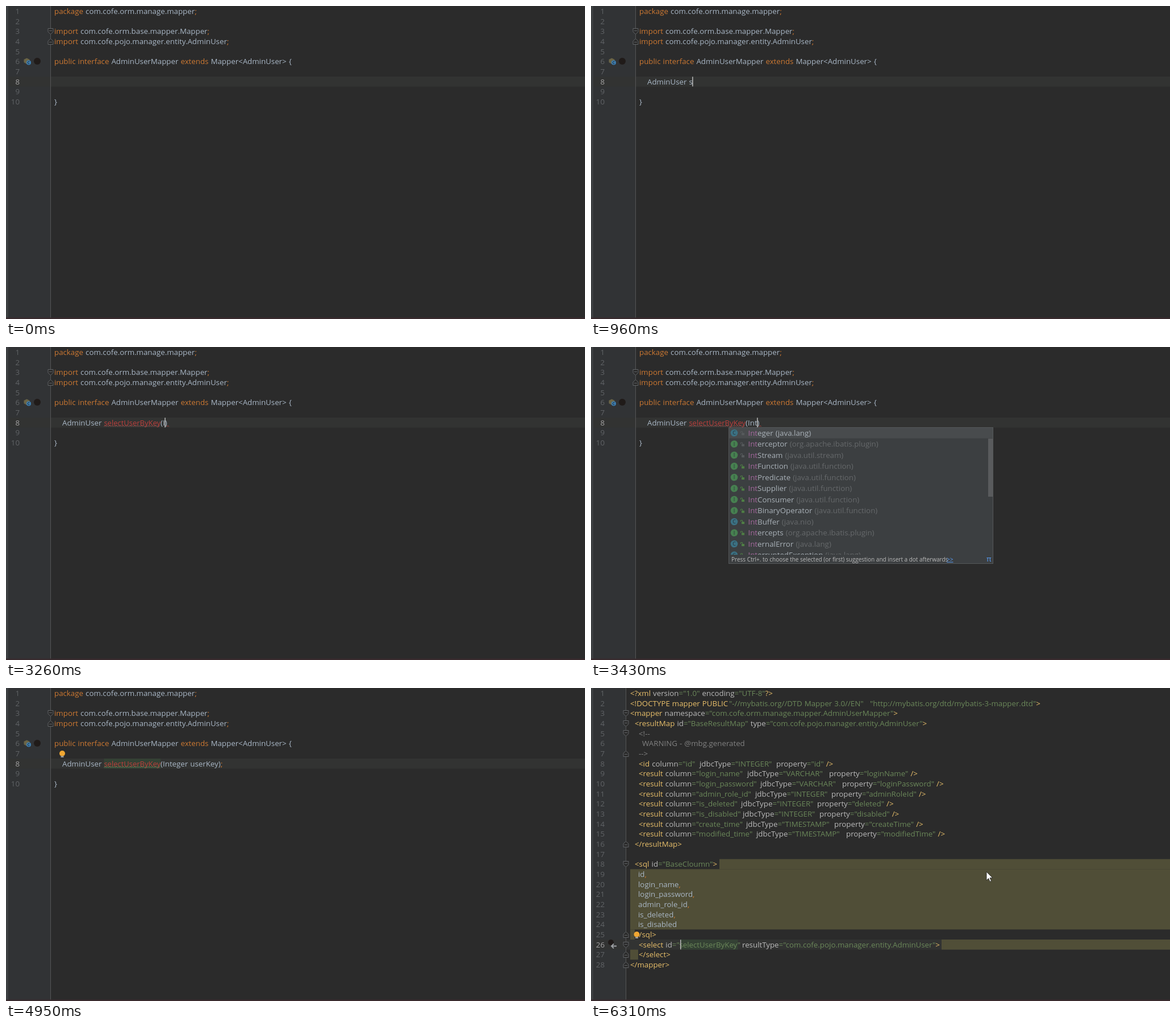
Write an HTML page that moves like this. It is 1019 px wide and 550 px high and loops after 6500 ms.

```html
<!DOCTYPE html>
<html lang="en">
<head>
<meta charset="utf-8">
<title>Mapper editor</title>
<style>
html, body { margin: 0; width: 100%; height: 100%; overflow: hidden; background: #2b2b2b; }
svg { display: block; width: 1019px; height: 550px; }
text { font: 13.3px "Open Sans", "Noto Sans", sans-serif; word-spacing: .6px; white-space: pre; fill: #a9b7c6; }
.kw { fill: #cc7832; }
.tag { fill: #e8bf6a; }
.attr { fill: #bababa; }
.str { fill: #6a8759; }
.com { fill: #808080; }
.num { fill: #606366; text-anchor: end; }
.now { fill: #a4a3a3; }
.id { font-size: 13px; }
.dim { fill: #7b837b; }
.bad { fill: #bc3f3c; }
.item { fill: #a9b1b8; }
.hit { fill: #a4689d; }
.pkg { fill: #66696b; }
.tip { font-size: 10px; word-spacing: 0; fill: #bbbbbb; }
.link { fill: #589df6; }
.mini { font-size: 9px; text-anchor: middle; fill: #263238; }
</style>
</head>
<body>
<svg viewBox="0 0 1019 550" id="stage"></svg>
<script>
const LOOP = 6500, ROW = 17.667, GREEN = '#344134', OLIVE = '#504e37';
const stage = document.getElementById('stage');
const pen = document.createElement('canvas').getContext('2d');

const esc = s => s.replace(/&/g, '&amp;').replace(/</g, '&lt;').replace(/>/g, '&gt;');
const rowTop = n => .33 + ROW * (n - 1);
const base = n => rowTop(n) + 13.6;
const rect = (x, y, w, h, fill, extra = '') =>
  `<rect x="${x}" y="${y}" width="${w}" height="${h}" fill="${fill}" ${extra}/>`;
const disc = (x, y, r, fill) => `<circle cx="${x}" cy="${y}" r="${r}" fill="${fill}"/>`;
const path = (d, stroke, fill = 'none', w = 1) =>
  `<path d="${d}" stroke="${stroke}" fill="${fill}" stroke-width="${w}"/>`;
const span = (s, cls) => `<tspan class="${cls}">${esc(s)}</tspan>`;
const text = (x, y, body, cls = '') => `<text x="${x}" y="${y}" class="${cls}">${body}</text>`;
const at = (list, t) => list.reduce((v, [start, value]) => t >= start ? value : v, list[0][1]);
const during = (t, a, b) => t >= a && t < b;

function width(s, size = 13.3) {
  pen.font = `${size}px "Open Sans", "Noto Sans", sans-serif`;
  return pen.measureText(s).width + .6 * (s.split(' ').length - 1);
}

function wave(x1, x2, y, color) {
  let d = `M${x1} ${y}`;
  for (let x = x1 + 2, up = true; x <= x2; x += 2, up = !up) d += `L${x} ${up ? y - 2 : y}`;
  return path(d, color, 'none', .9);
}

function fold(x, n, down) {
  const y = Math.round(rowTop(n) + 8.5) + .5, s = down ? 1 : -1;
  return path(`M${x - 4.5} ${y - 5 * s}h9v${6 * s}l-4.5 ${4 * s}l-4.5 ${-4 * s}z`, '#606366', '#2b2b2b') +
    path(`M${x - 2.5} ${y - s}h5`, '#606366');
}

function frame(lines, current, edge) {
  let out = rect(0, 0, 1019, 550, '#2b2b2b') + rect(4, 0, edge - 4, 550, '#313335') +
    rect(0, 0, 4, 550, '#3c3f41') + rect(4, rowTop(current), 1015, ROW, '#323332') +
    rect(edge, 0, 1, 550, '#555555');
  for (let n = 1; n <= lines; n++) out += text(24, base(n), n, 'num' + (n === current ? ' now' : ''));
  return out + rect(0, 547.5, 1019, 2.5, '#392b2e');
}

const caret = (x, n) => rect(x, rowTop(n) + .3, 1.5, ROW - .6, '#bbbbbb');
const bulb = (x, y) => disc(x, y, 5, '#f0a732') + rect(x - 2.5, y + 4.5, 5, 2.5, '#9a9da0');

// Java page
const code = (n, ...parts) =>
  text(85, base(n), parts.map(([s, cls]) => span(s, cls || '')).join(''));
const javaPage = frame(10, 8, 78) +
  code(1, ['package ', 'kw'], ['com.cofe.orm.manage.mapper'], [';', 'kw']) +
  code(3, ['import ', 'kw'], ['com.cofe.orm.base.mapper.Mapper'], [';', 'kw']) +
  code(4, ['import ', 'kw'], ['com.cofe.pojo.manager.entity.AdminUser'], [';', 'kw']) +
  code(6, ['public interface ', 'kw'], ['AdminUserMapper '], ['extends ', 'kw'], ['Mapper<AdminUser> {']) +
  code(10, ['}']) + fold(78.5, 3, true) + fold(78.5, 4, false) +
  path('M31.5 94l5-2.5 5 2.5v5l-5 3-5-3z', 'none', '#6b6547') + disc(40, 99.5, 4, '#3d7fb3') +
  path('M41.5 98a2 2 0 1 0 0 3', '#222b31') + disc(55, 97, 6, '#201b19');

const keys = [[0, '']];
const press = (t, s) => keys.push([t, s]);
function type(t, step, s) {
  for (const c of s) {
    press(t, keys[keys.length - 1][1] + c);
    t += step;
  }
}
type(170, 80, 'Admin');
press(830, 'AdminUser');
type(890, 60, ' ');
type(950, 70, 'select');
type(1670, 92, 'UserBy');
type(2250, 185, 'Key');
type(3080, 0, '(');
type(3230, 95, 'Int');
press(3560, 'AdminUser selectUserByKey(Integer');
type(3620, 55, ' user');
type(3930, 60, 'Key');
press(4350, 'AdminUser selectUserByKey(Integer userKey);');

// Identifier letters covered by the green mark
const marked = [[0, 0], [1490, 6], [1940, 10], [2440, 14], [2810, 15], [3040, 0], [4720, 15]];

function statement(t) {
  const typed = at(keys, t), y = base(8);
  const head = typed.slice(0, 10), id = typed.slice(10).split('(')[0], tail = typed.slice(10 + id.length);
  const open = tail && !tail.includes(')');
  const idX = 99 + width(head), tailX = idX + width(id, 13), endX = tailX + width(tail);
  const count = at(marked, t), markX = idX + width(id.slice(0, count), 13);
  let out = '';
  if (count) out += rect(idX, rowTop(8), markX - idX, ROW, GREEN);
  if (during(t, 3785, 3990)) out += rect(324, rowTop(8), 9, ROW, GREEN);
  out += text(99, y, esc(head)) + text(idX, y, esc(id), 'id ' + (tail ? 'bad' : count ? 'dim' : ''));
  out += text(tailX, y, esc(tail.replace(';', '') + (open ? ')' : '')));
  if (tail.endsWith(';')) out += text(endX - width(';'), y, ';', 'kw');
  if (tail) out += wave(idX, tailX, 140, t >= 4720 ? '#65875f' : '#8f5452');
  else if (count) out += wave(idX, markX, 140, '#6a7f68');
  if (open) out += wave(endX + 3, endX + 8, 140, '#bc3f3c');
  if (during(t, 4350, 4540)) out += wave(endX, endX + 3, 140, '#bc3f3c');
  if (during(t, 170, 4720)) out += caret(endX - .5, 8);
  return out;
}

// Completion lists: name, package, kind
const entity = 'com.cofe.pojo.manager.entity', mapper = 'com.cofe.orm.manage.mapper', view = 'com.cofe.pojo.manager.view';
const admins = [
  ['Admin', 'org.springframework.boot.autoconfigure.kafka.KafkaPro...', 'C'],
  ['AdminUser', entity, 'C'], ['AdminUserMapper', mapper, 'D'],
  ['AdminMenu', entity, 'C'], ['AdminMenuMapper', mapper, 'I'],
  ['AdminRole', entity, 'C'], ['AdminRoleMapper', mapper, 'I'],
  ['AdminMenuParam', view, 'C'], ['AdminRoleParam', view, 'C'], ['AdminUserParam', view, 'C'],
  ['AdminPermission', 'org.osgi.framework', 'C'],
  ['AbstractDataFieldMaxValueIncrementer', 'org.springframework.jd...', 'C']
];
const selects = [
  ['Select', 'org.apache.ibatis.annotations', 'I'], ['SelectKey', 'org.apache.ibatis.annotations', 'I'],
  ['SelectProvider', 'org.apache.ibatis.annotations', 'I'], ['Selector', 'java.nio.channels', 'C'],
  ['SelectorProvider', 'java.nio.channels.spi', 'C'], ['SelectionKey', 'java.nio.channels', 'C'],
  ['SelectableChannel', 'java.nio.channels', 'C'], ['SelectKeyGenerator', 'org.apache.ibatis.executor', 'C'],
  ['SelectionEvent', 'org.w3c.dom.events', 'C'], ['SelectItem', 'net.sf.jsqlparser.statement', 'I'],
  ['SelectBody', 'net.sf.jsqlparser.statement', 'I'], ['SelectVisitor', 'net.sf.jsqlparser', 'I']
];
const integers = [
  ['Integer', 'java.lang', 'C'], ['Interceptor', 'org.apache.ibatis.plugin', 'I'],
  ['IntStream', 'java.util.stream', 'I'], ['IntFunction', 'java.util.function', 'I'],
  ['IntPredicate', 'java.util.function', 'I'], ['IntSupplier', 'java.util.function', 'I'],
  ['IntConsumer', 'java.util.function', 'I'], ['IntBinaryOperator', 'java.util.function', 'I'],
  ['IntBuffer', 'java.nio', 'C'], ['Intercepts', 'org.apache.ibatis.plugin', 'I'],
  ['InternalError', 'java.lang', 'C'], ['InterruptedException', 'java.lang', 'C']
];
const kinds = { C: '#3b7183', I: '#478050', D: '#35463a' };

function popup(x, w, items, hits) {
  let rows = rect(x + 1, 142, w - 2, 18.5, '#484b4d');
  items.forEach(([name, pkg, kind], i) => {
    const y = 151 + 19.5 * i, n = /^Abstract/.test(name) ? 0 : hits;
    const label = n ? span(name.slice(0, n), 'hit') + span(name.slice(n), 'item')
      : name.split(/(A|D|M|In)/).map(s => span(s, /^(A|D|M|In)$/.test(s) ? 'hit' : 'item')).join('');
    const lock = i < 3 ? '#55595b' : '#4f7d45';
    rows += disc(x + 10, y, 6.3, kinds[kind]) + text(x + 10, y + 3.2, kind === 'C' ? 'C' : 'I', 'mini') +
      rect(x + 23, y, 5, 4, lock) + path(`M${x + 21.5} ${y}v-2.5h3v2.5`, lock) +
      text(x + 34.5, y + 4.7, label + span(` (${pkg}${pkg.endsWith('...') ? '' : ')'}`, i ? 'pkg' : 'item'));
  });
  return rect(x + .5, 141.5, w - 1, 239, '#3c3f41', 'stroke="#55585a"') +
    `<svg x="0" y="0" style="width:${x + w - 10}px;height:365px">${rows}</svg>` +
    rect(x + w - 9, 161, 8, 102, '#595b5d') + rect(x + 1, 365, w - 2, 15, '#3c3f41') +
    text(x + 5, 376.5, 'Press Ctrl+. to choose the selected (or first) suggestion and insert a dot afterwards', 'tip') +
    text(x + 384, 376.5, '<tspan text-decoration="underline">&gt;&gt;</tspan>', 'tip link') +
    (w > 440 ? text(x + 454, 377, 'π', 'link') : '');
}

function actions() {
  const rows = ['Generate statement', 'Add Javadoc', "Annotate method as '@Deprecated'",
    'Edit method contract', "Make 'default'", "Safe delete 'selectUserByKey(Integer)'"];
  return rect(235.5, 141.5, 307, 119, '#3c3f41', 'stroke="#55585a"') + rect(236, 142, 306, 19.5, '#4b6eaf') +
    rows.map((s, i) => {
      const y = 156.5 + 19.5 * i;
      return disc(247, y - 4.5, 4, '#f0a732') + text(260, y, esc(s), 'item') +
        path(`M530 ${y - 8}l4 3.5-4 3.5z`, 'none', '#a0a3a5');
    }).join('');
}

function java(t) {
  const typed = at(keys, t);
  let out = javaPage + statement(t);
  if (during(t, 210, 830)) out += popup(64, 466, admins, typed.length);
  if (during(t, 1010, 1370)) out += popup(137, 427, selects, typed.length - 10);
  if (during(t, 3300, 3560)) out += popup(242, 466, integers, typed.split('(')[1].length);
  if (during(t, 3040, 3080) || during(t, 4950, 5260)) out += bulb(99, 115);
  if (during(t, 4990, 5260)) out += actions();
  return out;
}

// XML page
const token = /="[^"]*"|"[^"]*"|<[!?\/]?\w+|[?\/]?>|[^"=<>?\/]+/g;
const paint = s => s.match(token).map(p =>
  span(p, /"/.test(p) ? 'str' : /[<>]|PUBLIC/.test(p) ? 'tag' : 'attr')).join('');
const xml = (n, x, s) => text(x, base(n), paint(s));
const column = (n, tag, col, x1, kind, x2, prop) =>
  xml(n, 84, `<${tag} column="${col}"`) + xml(n, x1, `jdbcType="${kind}"`) + xml(n, x2, `property="${prop}" />`);

const xmlText =
  xml(1, 69, '<?xml version="1.0" encoding="UTF-8"?>') +
  xml(2, 69, '<!DOCTYPE mapper PUBLIC') +
  xml(2, 243, '"-//mybatis.org//DTD Mapper 3.0//EN"') +
  xml(2, 491, '"http://mybatis.org/dtd/mybatis-3-mapper.dtd">') +
  xml(3, 69, '<mapper namespace="com.cofe.orm.manage.mapper.AdminUserMapper">') +
  xml(4, 77, '<resultMap id="BaseResultMap" type="com.cofe.pojo.manager.entity.AdminUser">') +
  text(84, base(5), '&lt;!--', 'com') +
  text(90, base(6), 'WARNING - @mbg.generated', 'com') +
  text(84, base(7), '--&gt;', 'com') +
  column(8, 'id', 'id', 191, 'INTEGER', 326, 'id') +
  column(9, 'result', 'login_name', 275, 'VARCHAR', 419, 'loginName') +
  column(10, 'result', 'login_password', 298, 'VARCHAR', 442, 'loginPassword') +
  column(11, 'result', 'admin_role_id', 289, 'INTEGER', 423, 'adminRoleId') +
  column(12, 'result', 'is_deleted', 264, 'INTEGER', 398, 'deleted') +
  column(13, 'result', 'is_disabled', 267, 'INTEGER', 402, 'disabled') +
  column(14, 'result', 'create_time', 273, 'TIMESTAMP', 428, 'createTime') +
  column(15, 'result', 'modified_time', 291, 'TIMESTAMP', 449, 'modifiedTime') +
  xml(16, 77, '</resultMap>') +
  xml(18, 77, '<sql id="BaseCloumn">') +
  ['id', 'login_name', 'login_password', 'admin_role_id', 'is_deleted', 'is_disabled'].map((s, i) =>
    text(83, base(19 + i), span(s, '') + (i < 5 ? span(',', 'kw') : ''))).join('') +
  xml(25, 77, '</sql>') +
  xml(26, 84, '<select id="selectUserByKey"') +
  xml(26, 266, 'resultType="com.cofe.pojo.manager.entity.AdminUser">') +
  xml(27, 84, '</select>') +
  xml(28, 69, '</mapper>');
const xmlPage = frame(28, 26, 61) +
  [3, 4, 5, 18, 26].map(n => fold(61.5, n, true)).join('') +
  [7, 16, 25, 27, 28].map(n => fold(61.5, n, false)).join('') +
  disc(35, 447, 5, '#201b19') + path('M45 453.5h-9m4-4l-4 4 4 4', '#9da0a3', 'none', 1.8);
const injected = rect(226, rowTop(18), 793, ROW, OLIVE) + rect(69, rowTop(19), 950, ROW * 6, OLIVE) +
  rect(69, rowTop(25), 8, ROW, OLIVE) + rect(617, rowTop(26), 402, ROW, OLIVE) + rect(69, rowTop(27), 14, ROW, OLIVE);

function mapperXml(t) {
  let out = xmlPage;
  if (t >= 5650) out += injected;
  if (t >= 5740) out += rect(158, rowTop(26), 100.5, ROW, GREEN);
  out += xmlText;
  if (t >= 5970) out += bulb(80.5, 433);
  if (during(t, 5740, 6080) || t >= 6310) out += caret(157, 26);
  return out;
}

const pointer = path('M696 323v15l3.6-3.4 2.5 5.6 2.4-1-2.5-5.5h4.8z', '#222222', '#ffffff', .8);

let shown = '';
function draw(t) {
  const picture = (t < 5590 ? java(t) : mapperXml(t)) + (t >= 5560 ? pointer : '');
  if (picture !== shown) stage.innerHTML = shown = picture;
}

const start = performance.now();
function tick() {
  draw((performance.now() - start) % LOOP);
  requestAnimationFrame(tick);
}
tick();
</script>
</body>
</html>
```
